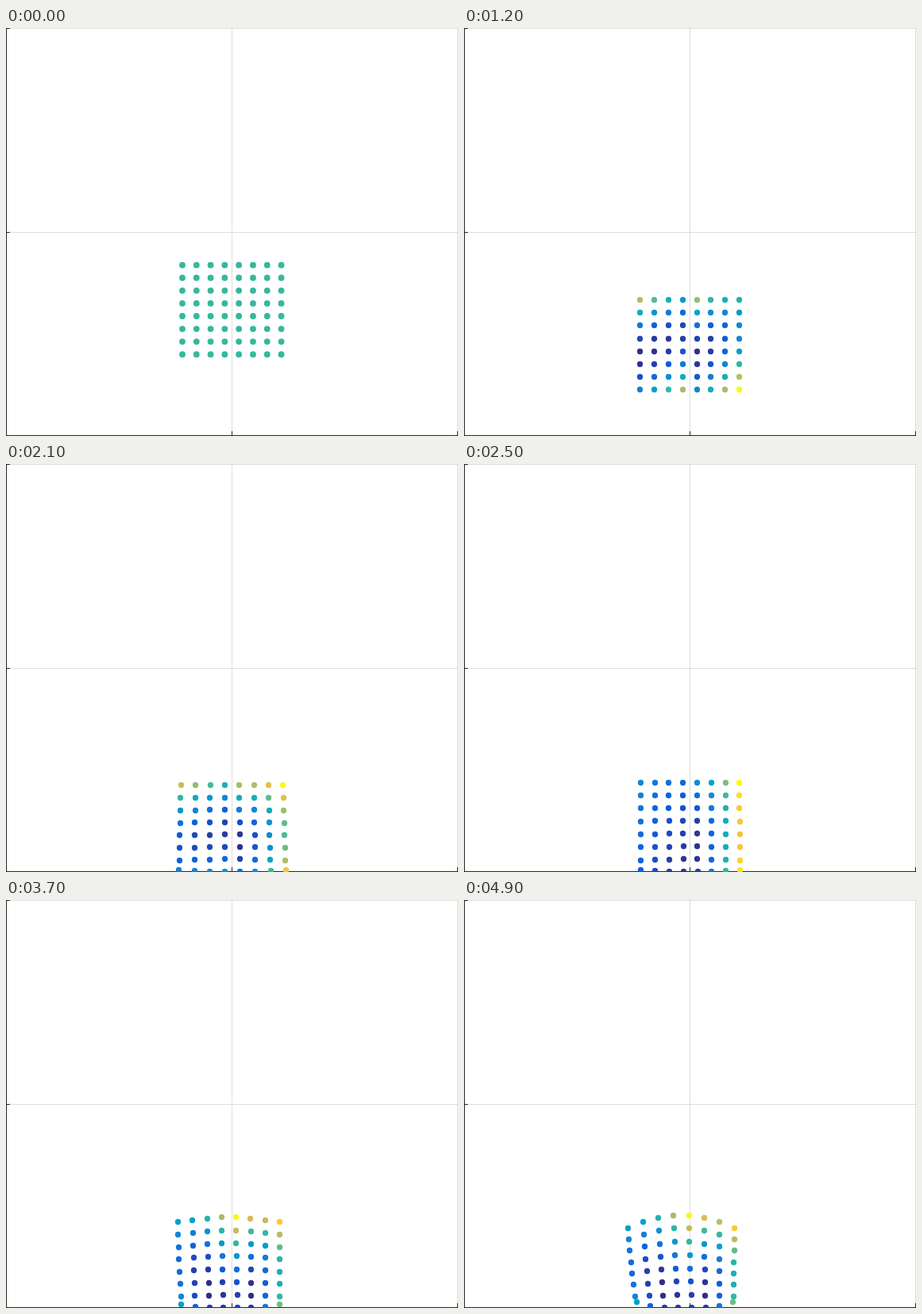
Recreate the animation shown at these times as an HTML page with a canvas. Size 569x514 px, loop 5000 ms.

```html
<!DOCTYPE html>
<html lang="en">
<head>
<meta charset="utf-8">
<title>Falling block</title>
<style>
html, body { margin: 0; width: 569px; height: 514px; overflow: hidden; background: #fff; }
canvas { display: block; }
</style>
</head>
<body>
<canvas id="stage" width="569" height="514"></canvas>
<script>
const ctx = document.getElementById("stage").getContext("2d");
const mix = (a, b, p) => a + (b - a) * p;
const clamp = p => Math.min(1, Math.max(0, p));

// Cold to hot.
const ramp = [[53,42,135], [15,92,221], [20,129,214], [6,164,202], [46,183,164],
  [135,191,119], [209,187,89], [254,200,50], [249,251,14]];

// Stress bowl over four columns: its valley runs through row r0 + slant * k.
const bowl = (across, k0, down, r0, slant) => (k, r) =>
  across * (k - k0) ** 2 + down * (r - r0 - slant * k) ** 2;

// The left and right halves carry separate bowls; steps between are blended.
const phases = [
  { at: 8, halves: [bowl(0, 0, .12, 4, -1), bowl(.23, .4, .14, 3.7, -1.25)] },
  { at: 17, halves: [bowl(0, 0, .34, 4.6, -.33), bowl(0, 0, .3, 4.6, -.25)] },
  { at: 25, halves: [bowl(.06, 4.2, .015, 9, 0), bowl(.6, -.4, .09, 5, -.4)] },
  { at: 30, halves: [bowl(.8, 1.45, .16, 3.5, .7), bowl(.2, 3, .12, .2, .5)] },
  { at: 37, halves: [bowl(.25, 2.2, .11, 3.5, 1), bowl(.62, .75, .16, 6.5, -.7)] }
];

// Levels from 0 to 1, scaled to the hottest dot.
function levels(n) {
  const next = phases.findIndex(p => p.at > n);
  const b = phases[next < 0 ? phases.length - 1 : Math.max(1, next)];
  const a = phases[phases.indexOf(b) - 1];
  const p = clamp((n - a.at) / (b.at - a.at));
  const list = Array.from({ length: 64 }, (_, j) => {
    const r = j >> 3, half = (j & 7) >> 2, k = j & 3;
    return mix(a.halves[half](k, r), b.halves[half](k, r), p);
  });
  const max = Math.max(...list);
  return list.map(v => v / max);
}

function colour(level) {
  const x = level * 8, i = Math.min(7, Math.floor(x));
  return `rgb(${ramp[i].map((v, j) => Math.round(mix(v, ramp[i + 1][j], x - i)))})`;
}

// Free fall, then a damped bounce.
function topEdge(n) {
  if (n <= 17) return 298.5 + .308 * n * n;
  const s = n - 17;
  return 401.7 - 14 * Math.exp(-.35 * s) * Math.cos(.9 * s);
}

function place(n, r, c) {
  const top = topEdge(n), v = r / 7;
  if (n <= 18) return [221.6 + 17.85 * c, top + 16.05 * r];
  const bend = clamp((n - 30) / 19), d = Math.abs(c - 3.5);
  const spread = n < 25 ? 5 * Math.sin(Math.PI * (n - 18) / 7) * (.4 + .6 * v) : 0;
  const lean = v ** 1.3;
  const left = mix(222.3 - 15.7 * bend, 222.8 - 5.2 * bend, lean) - spread;
  const right = mix(346.9 - 6.45 * bend, 347.4 - 8.7 * bend, lean) + spread;
  const crest = top + bend * (1.97 * d ** 1.7 - 5.2);
  const y = r < 7 ? mix(crest, 497.5 + .5 * d, r / 6)
    : 513.5 - (2 + 5 * bend) * (d / 3.5) ** 4;
  return [mix(left, right, c / 7), y];
}

function dot(x, y, radius, fill) {
  ctx.fillStyle = fill;
  ctx.beginPath();
  ctx.arc(x, y, radius, 0, 2 * Math.PI);
  ctx.fill();
}

function bars(fill, ...boxes) {
  ctx.fillStyle = fill;
  boxes.forEach(b => ctx.fillRect(...b));
}

function draw(n) {
  bars("#fff", [0, 0, 569, 514]);
  bars("rgba(38,38,38,.15)", [284, 0, 1, 514], [568, 0, 1, 514],
    [0, 0, 569, 1], [0, 257, 569, 1]);
  bars("#262626", [0, 0, 1, 514], [0, 513, 569, 1], [0, 0, 5, 1], [0, 257, 5, 1],
    [284, 508, 1, 6], [568, 508, 1, 6]);
  const heat = levels(n);
  for (let j = 0; j < 64; j++) {
    const r = j >> 3, c = j & 7;
    if (n === 0) {
      dot(222 + 17.79 * c, 298.7 + 16.07 * r, 3.9, "#35b89b");
    } else {
      const [x, y] = place(n, r, c).map(q => Math.floor(q) + .5);
      dot(x, y, 3.65, colour(heat[j]));
    }
  }
}

const start = performance.now();
function tick() {
  draw(Math.floor((performance.now() - start) % 5000 / 100));
  requestAnimationFrame(tick);
}
tick();
</script>
</body>
</html>
```
